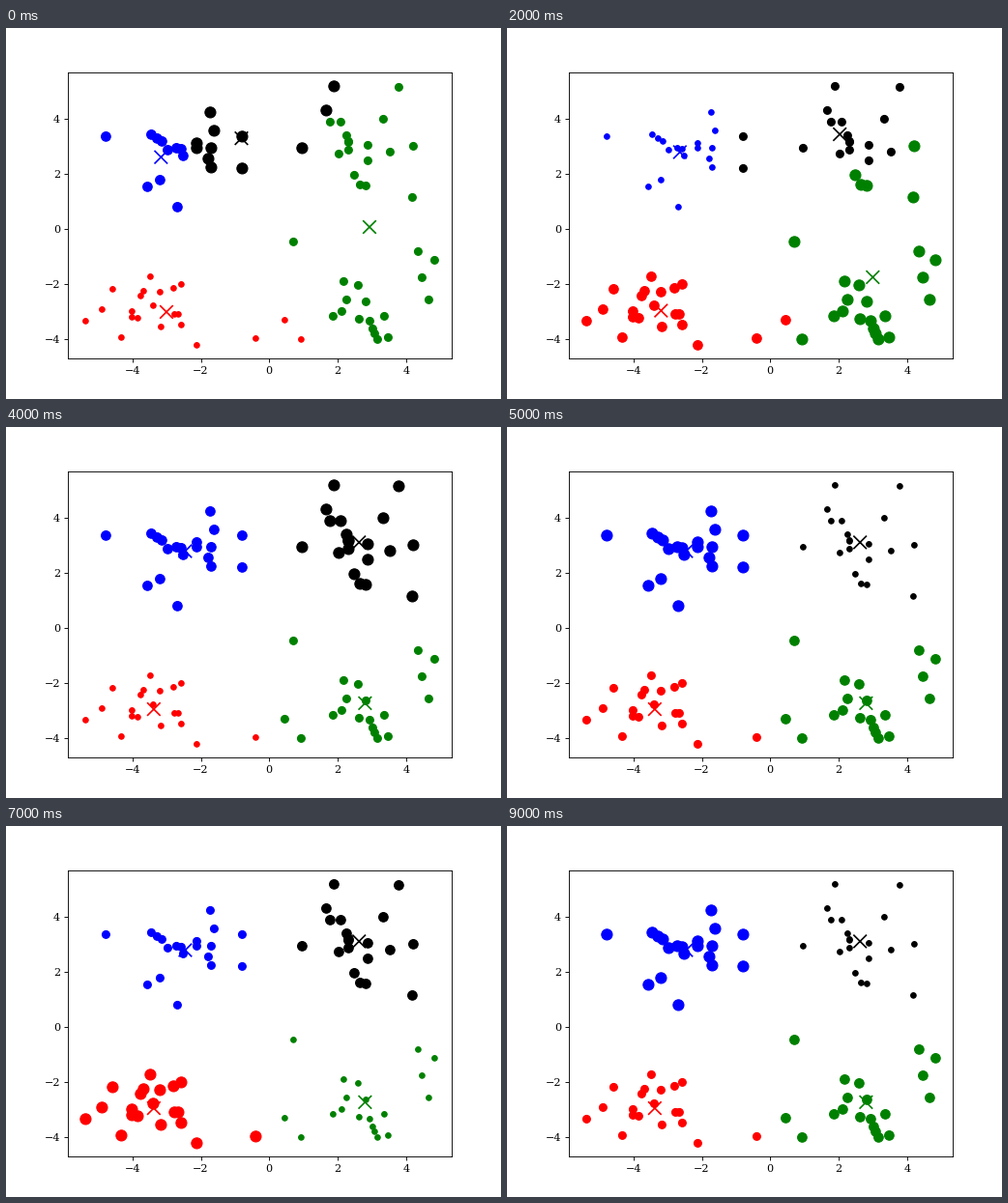
Recreate the animation shown at these times as a matplotlib script. Size 512 by 384 pixels, loop 10 s.

```python
import numpy as np
import matplotlib.pyplot as plt
from matplotlib.animation import FuncAnimation

WIDTH, HEIGHT, DPI = 512, 384, 80
STEPS, STEP_MS = 10, 1000
COLORS = np.array(["red", "green", "blue", "black"])
SIZES = np.array([25, 50, 75, 100])

# Samples of the four blobs, in stage pixels from the top left
LOWER_LEFT = [
    (82, 303), (99, 291), (110, 270), (149, 257), (142, 272),
    (139, 277), (159, 273), (173, 269), (181, 265), (152, 287),
    (130, 293), (130, 299), (136, 300), (174, 296), (178, 296),
    (160, 309), (181, 307), (119, 320), (197, 328), (258, 321)]
LOWER_RIGHT = [
    (297, 221), (426, 231), (443, 240), (430, 258), (437, 281),
    (349, 262), (364, 266), (352, 281), (372, 283), (347, 293),
    (338, 298), (365, 301), (376, 303), (391, 298), (379, 311),
    (381, 316), (384, 322), (395, 320), (305, 322), (288, 302)]
UPPER_LEFT = [
    (103, 112), (150, 110), (156, 114), (161, 117), (167, 126),
    (176, 124), (181, 125), (183, 132), (146, 164), (159, 157),
    (177, 185), (211, 87), (215, 106), (197, 119), (197, 124),
    (212, 124), (209, 135), (212, 144), (244, 112), (244, 145)]
UPPER_RIGHT = [
    (339, 60), (406, 61), (331, 85), (335, 97), (346, 97),
    (390, 94), (352, 111), (354, 117), (354, 118), (354, 126),
    (344, 130), (374, 121), (374, 137), (397, 128), (421, 122),
    (360, 152), (366, 162), (372, 163), (420, 175), (306, 124)]
SEEDS = np.array([(-3.8, -3.0), (4.1, 1.2), (-2.97, 2.87), (-1.7, 2.94)])

plt.rcParams["font.family"] = "DejaVu Serif"
fig, ax = plt.subplots(figsize=(WIDTH / DPI, HEIGHT / DPI), dpi=DPI)
ax.set_xlim(-5.89, 5.33)
ax.set_ylim(-4.68, 5.66)


def to_data(pixels):
    flipped = np.array(pixels, float) * (1, -1) + (0.4, HEIGHT - 0.4)
    return ax.transData.inverted().transform(flipped)


def cluster(points, centers):
    """Return (labels, centers) for every k-means step."""
    history = []
    for _ in range(STEPS):
        gaps = points[:, None] - centers[None]
        labels = np.hypot(gaps[..., 0], gaps[..., 1]).argmin(axis=1)
        centers = np.array([points[labels == k].mean(axis=0)
                            for k in range(len(centers))])
        history.append((labels, centers))
    return history


points = to_data(LOWER_LEFT + LOWER_RIGHT + UPPER_LEFT + UPPER_RIGHT)
history = cluster(points, SEEDS)
dots = ax.scatter(*points.T, edgecolors="face")
crosses = ax.scatter(*SEEDS.T, s=150, c=COLORS, marker="x", linewidths=1.5)


def update(step):
    labels, centers = history[step]
    dots.set_facecolor(COLORS[labels])
    dots.set_sizes(SIZES[(labels + step) % 4])
    crosses.set_offsets(centers)
    return dots, crosses


anim = FuncAnimation(fig, update, frames=STEPS, interval=STEP_MS,
                     repeat=True, repeat_delay=0)
plt.show()
```
